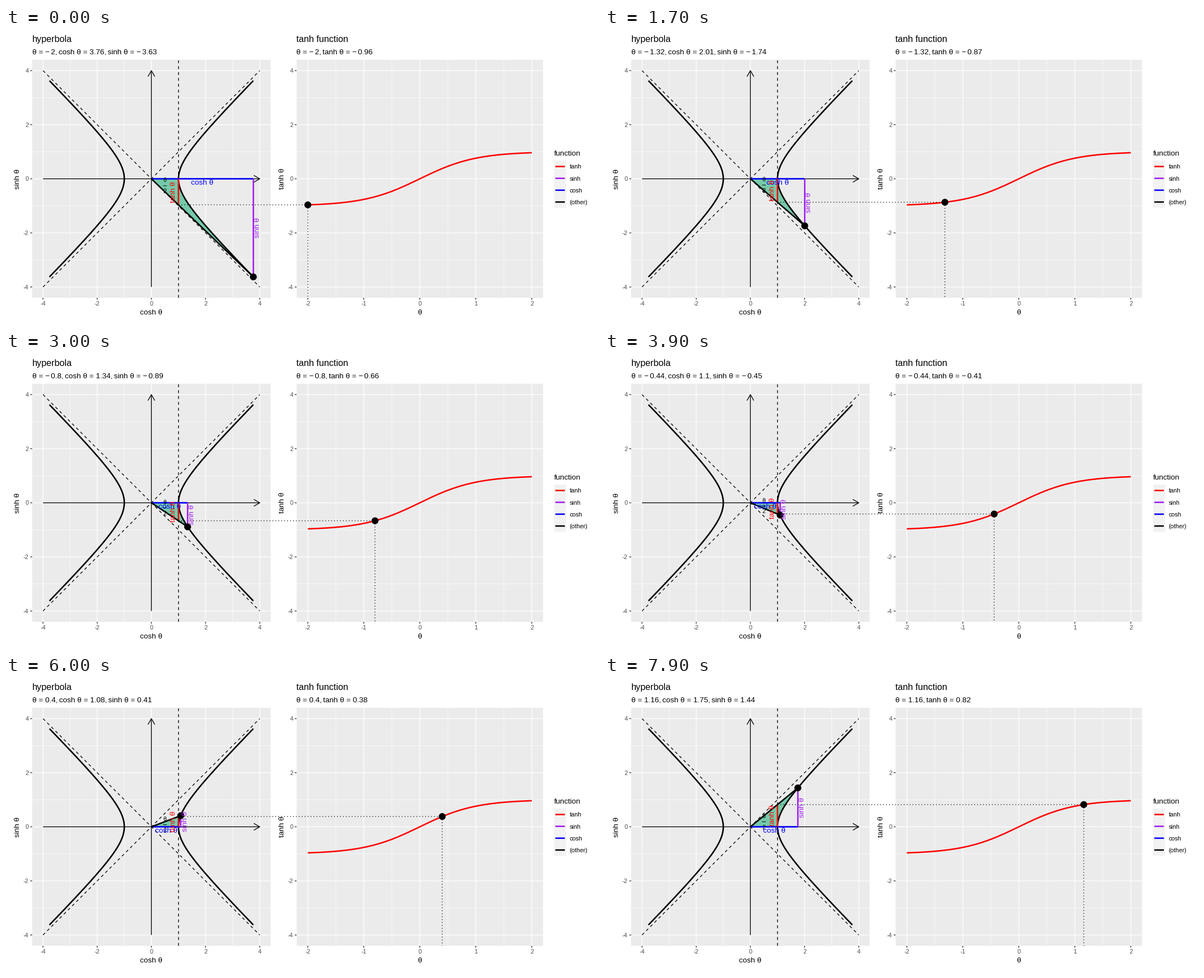
A matplotlib script that plays this animation: 1058x529 px, repeating every 8000 ms.

```python
import numpy as np
import matplotlib.pyplot as plt
from matplotlib.animation import FuncAnimation
from matplotlib.patches import Circle, Polygon, Rectangle

plt.rcParams["font.family"] = ["Liberation Sans", "DejaVu Sans"]

W, H, DPI = 1058, 529, 100
PT = 72 / DPI                     # points per pixel
FRAMES, INTERVAL = 80, 100

THICK, MID, THIN = 2.61, 1.31, 0.65
TITLE, BODY, SMALL = 16.16, 13.47, 10.78
PURPLE = "#A020F0"
DASHED, DOTTED = (0, (4, 4)), (0, (1, 3))

# panel geometry in pixels
TOP, BOTTOM = 56.8, 482.2
LEFT = (46.7, 472.1)
RIGHT = (518.5, 958.1)
UNIT, CX, CY = 48.34, 259.4, 269.5
T_UNIT, T_CX = 99.9, 738.3

fig = plt.figure(figsize=(W / DPI, H / DPI), dpi=DPI, facecolor="white")
ax = fig.add_axes([0, 0, 1, 1])
ax.set_xlim(0, W)
ax.set_ylim(H, 0)
ax.axis("off")


def px(x):
    return CX + UNIT * x


def py(y):
    return CY - UNIT * y


def tx(t):
    return T_CX + T_UNIT * t


def line(xs, ys, color="black", width=MID, z=3, style="-"):
    return ax.plot(xs, ys, color=color, lw=width * PT, ls=style, zorder=z,
                   solid_capstyle="butt", dash_capstyle="butt", snap=False)[0]


def text(x, y, s, size=BODY, color="black", ha="left", rot=0, z=6):
    return ax.text(x, y, s, fontsize=size * PT, color=color, ha=ha,
                   va="baseline", rotation=rot, rotation_mode="anchor", zorder=z)


def box(x0, y0, x1, y1, color):
    ax.add_patch(Rectangle((x0, y0), x1 - x0, y1 - y0, fc=color, ec="none",
                           zorder=0, snap=False))


def panel(span, to_x, x_major, x_minor):
    x0, x1 = span
    box(x0, TOP, x1, BOTTOM, "#EBEBEB")
    for xs, ys, w in ((x_minor, (-3, -1, 1, 3), THIN),
                      (x_major, range(-4, 5, 2), MID)):
        for v in xs:
            line([to_x(v)] * 2, [TOP, BOTTOM], "white", w, 1)
        for v in ys:
            line([x0, x1], [py(v)] * 2, "white", w, 1)
    for v in x_major:
        line([to_x(v)] * 2, [BOTTOM, BOTTOM + 3.37], "#333333")
        text(to_x(v), 496.3, str(v), SMALL, "#4D4D4D", "center")
    for v in range(-4, 5, 2):
        line([x0 - 3.37, x0], [py(v)] * 2, "#333333")
        text(x0 - 6.06, py(v) + 3.9, str(v), SMALL, "#4D4D4D", "right")


def legend():
    text(978, 228.3, "function")
    rows = (("tanh", "red"), ("sinh", PURPLE), ("cosh", "blue"), ("(other)", "black"))
    for i, (name, color) in enumerate(rows):
        y = 247.5 + 21.17 * i
        box(978, y - 10.6, 999.2, y + 10.6, "#F2F2F2")
        line([980.1, 997.1], [y, y], color, THICK)
        text(1005.8, y + 3.9, name, SMALL)


panel(LEFT, px, range(-4, 5, 2), (-3, -1, 1, 3))
panel(RIGHT, tx, range(-2, 3), (-1.5, -0.5, 0.5, 1.5))
legend()

text(46.7, 24.8, "hyperbola", TITLE)
text(518.5, 24.8, "tanh function", TITLE)
text(CX, 512.2, "cosh θ", ha="center")
text(T_CX, 512.2, "θ", ha="center")
text(23.7, CY, "sinh θ", ha="center", rot=90)
text(496, CY, "tanh θ", ha="center", rot=90)

# axes with open arrow heads
tip_x, tip_y = px(4), py(4)
line([px(-4), tip_x], [CY, CY])
line([CX, CX], [py(-4), tip_y])
line([tip_x - 10.6, tip_x, tip_x - 10.6], [CY - 6.1, CY, CY + 6.1])
line([CX - 6.1, CX, CX + 6.1], [tip_y + 10.6, tip_y, tip_y + 10.6])

# asymptotes, tangent line and both branches
line([px(-4), px(4)], [py(-4), py(4)], style=DASHED)
line([px(-4), px(4)], [py(4), py(-4)], style=DASHED)
line([px(1), px(1)], [BOTTOM, TOP], style=DASHED)
ts = np.linspace(-2, 2, 201)
for side in (-1, 1):
    line(px(side * np.cosh(ts)), py(np.sinh(ts)), width=THICK)
line(tx(ts), py(np.tanh(ts)), "red", THICK)

# moving parts
fan = ax.add_patch(Polygon([[CX, CY], [CX, CY]], fc="#00A968", ec="none",
                           alpha=0.5, zorder=2))
level = line([], [], style=DOTTED, z=4)
drop = line([], [], style=DOTTED, z=4)
cosh_line = line([], [], "blue", THICK, 4)
sinh_line = line([], [], PURPLE, THICK, 4)
tanh_line = line([], [], "red", THICK, 4)
radius = line([], [], "black", THICK, 4)
dots = [ax.add_patch(Circle((0, 0), 6.15, fc="black", ec="none", zorder=5))
        for _ in range(2)]

half_top = text(px(0.5), 0, "θ", 10.6, ha="center")
half_bar = line([], [], width=1, z=6)
half_low = text(px(0.5), 0, "2", 10.6, ha="center")
cosh_tag = text(0, CY + 10.7, "cosh θ", color="blue", ha="center")
sinh_tag = text(0, 0, "sinh θ", color=PURPLE, ha="center", rot=90)
tanh_tag = text(px(1) - 6.2, 0, "tanh θ", color="red", ha="center", rot=90)
left_sub = text(46.7, 46, "")
right_sub = text(518.5, 46, "")

GAP = "\u2006"


def num(v):
    v = round(v, 2) + 0.0
    return ("−" + GAP if v < 0 else "") + f"{abs(v):g}"


def caption(**values):
    return ("," + GAP).join(f"{k.replace('_', ' ')} = {num(v)}"
                            for k, v in values.items())


def update(i):
    t = round(-2 + 0.04 * i, 2)
    c, s, h = np.cosh(t), np.sinh(t), np.tanh(t)
    x, y, yh = px(c), py(s), py(h)

    arc = np.linspace(0, t, 80)
    edge = np.column_stack([px(np.cosh(arc)), py(np.sinh(arc))])
    fan.set_xy(np.vstack([[CX, CY], edge]))

    level.set_data([px(1), tx(t)], [yh, yh])
    drop.set_data([tx(t), tx(t)], [yh, BOTTOM])
    cosh_line.set_data([CX, x], [CY, CY])
    sinh_line.set_data([x, x], [CY, y])
    tanh_line.set_data([px(1), px(1)], [CY, yh])
    radius.set_data([CX, x], [CY, y])
    dots[0].center = (x, y)
    dots[1].center = (tx(t), yh)

    mid = py(h / 4)
    half_top.set_y(mid - 5.8)
    half_bar.set_data([px(0.5) - 3.3, px(0.5) + 3.3], [mid + 0.8] * 2)
    half_low.set_y(mid + 14)
    cosh_tag.set_x(px(c / 2))
    sinh_tag.set_position((x + 10.9, py(s / 2)))
    tanh_tag.set_y(py(h / 2))

    left_sub.set_text(caption(θ=t, cosh_θ=c, sinh_θ=s))
    right_sub.set_text(caption(θ=t, tanh_θ=h))
    return []


anim = FuncAnimation(fig, update, frames=FRAMES, interval=INTERVAL,
                     init_func=lambda: update(0), repeat=True, repeat_delay=0)
plt.show()
```
